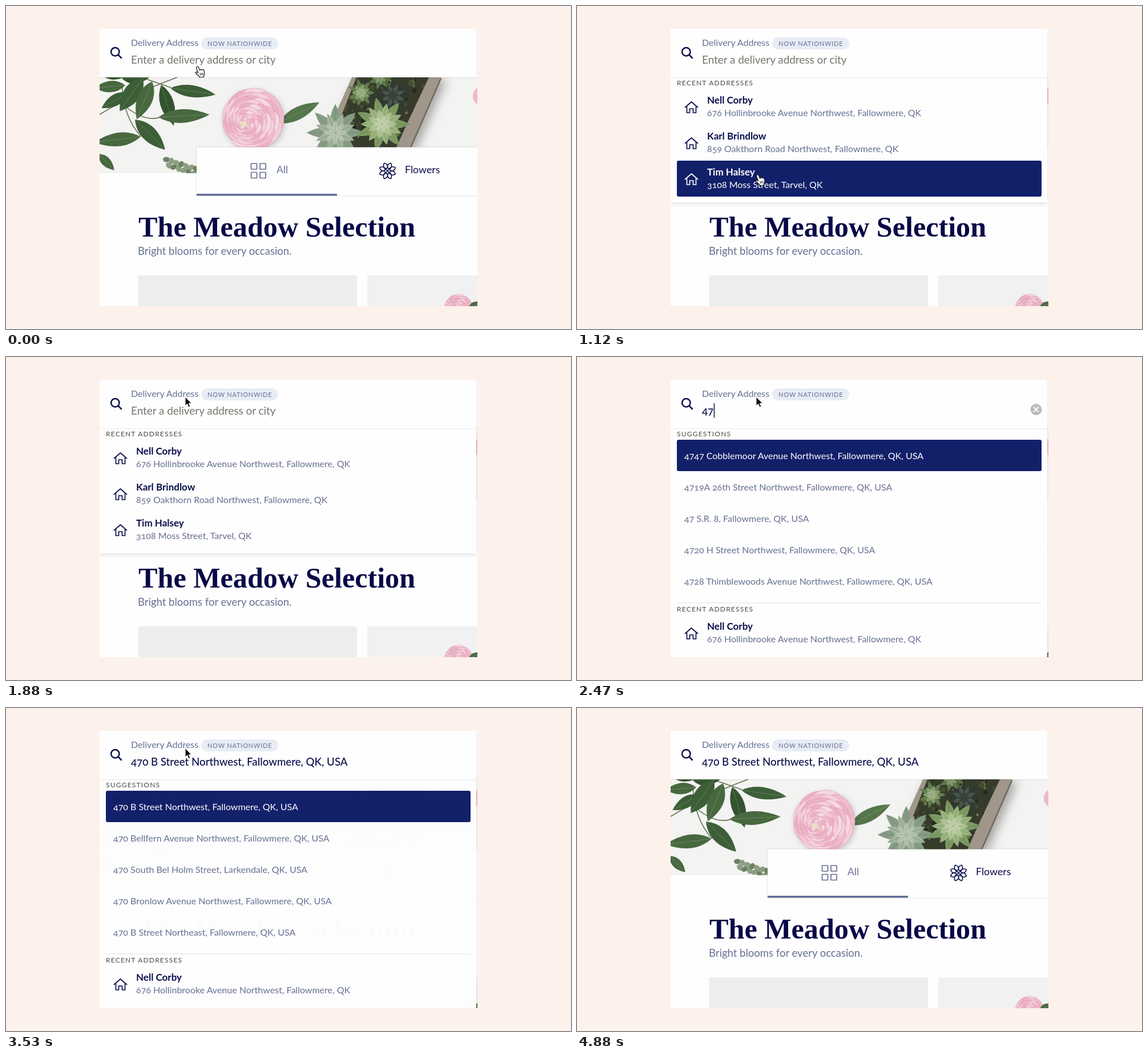
Write an HTML page that moves like this. It is 990 by 566 pixels and loops after 4.94 s.

```html
<!DOCTYPE html>
<html lang="en">
<head>
<meta charset="utf-8">
<title>Delivery address search</title>
<style>
html, body { margin: 0; height: 100%; overflow: hidden; background: #fdf1ec; }
svg { display: block; width: 100vw; height: 100vh; font-family: Lato, "Open Sans", sans-serif; font-variant-numeric: oldstyle-nums; }
text { white-space: pre; }
.caps { font-size: 12px; letter-spacing: 1.2px; fill: #474b40; }
.row { --h: 0; }
.row .back { fill: #12206a; opacity: var(--h); }
.row text { font-size: 16px; fill: color-mix(in srgb, #fff calc(var(--h) * 100%), #667093); }
.row .name { font-size: 17px; font-weight: 700; fill: color-mix(in srgb, #fff calc(var(--h) * 100%), #0b0f4b); }
.row path { fill: none; stroke-width: 1.7; stroke: color-mix(in srgb, #fff calc(var(--h) * 100%), #0b0f4b); }
.sheet { fill: #fefefe; filter: drop-shadow(0 2px 4px #0002); }
</style>
</head>
<body>
<svg id="stage" viewBox="0 0 990 566"></svg>
<script>
const LOOP = 4940, NAVY = '#0b0f4b', SLATE = '#667093';
const CITY = 'Fallowmere, QK';
const RESULTS = {
  '4': ['4 Bellfern Avenue Northwest', '4 Oakthorn Road Northwest', '41 H Street Northwest', '4 Cobblemoor Avenue Northwest', '45 Bronlow Street Northeast'],
  '47': ['4747 Cobblemoor Avenue Northwest', '4719A 26th Street Northwest', '47 S.R. 8', '4720 H Street Northwest', '4728 Thimblewoods Avenue Northwest'],
  '470': ['470 Cobblemoor Avenue Northwest', '470 H Street Northwest', '470 Bellfern Avenue Northwest', '470 26th Street Northeast', '470 Oakthorn Road Northwest'],
  '470 b': ['470 B Street Northwest', '470 Bellfern Avenue Northwest', '470 South Bel Holm Street, Larkendale, QK', '470 Bronlow Avenue Northwest', '470 B Street Northeast']
};
const full = s => (s.includes(',') ? s : `${s}, ${CITY}`) + ', USA';
const PEOPLE = [
  ['Nell Corby', `676 Hollinbrooke Avenue Northwest, ${CITY}`],
  ['Karl Brindlow', `859 Oakthorn Road Northwest, ${CITY}`],
  ['Tim Halsey', '3108 Moss Street, Tarvel, QK']
];

// Markup helpers
const text = (x, y, s, size, fill, more = '') => `<text x="${x}" y="${y}" font-size="${size}" fill="${fill}" ${more}>${s}</text>`;
const rect = (x, y, w, h, fill, more = '') => `<rect x="${x}" y="${y}" width="${w}" height="${h}" fill="${fill}" ${more}/>`;
const caps = (y, s) => `<text class="caps" x="175" y="${y}">${s}</text>`;
const times = (n, fn) => Array.from({ length: n }, (_, i) => fn(i)).join('');
const rand = i => { const v = Math.sin(i * 12.9898) * 43758.5453; return v - Math.floor(v); };

// A leaf grows from its base at an angle in degrees; w is its full width
function leaf(x, y, angle, len, w, fill, vein = '#ffffff38') {
  return `<g transform="translate(${x} ${y}) rotate(${angle})">
    <path d="M0 0Q${len * .42} ${w} ${len} 0Q${len * .42} ${-w} 0 0" fill="${fill}"/>
    <path d="M0 0H${len}" stroke="${vein}" stroke-width=".8"/></g>`;
}

const rosette = (x, y, r, n, colors) => colors.map((c, k) => times(n, i => {
  const len = r * (1 - k / (colors.length + .6));
  return leaf(x, y, (i + k / 2) * 360 / n, len, len * .34, c, '#26402a40');
})).join('');

// Overlapping petals in shrinking rings, drifting towards the heart
function rose(x, y, r) {
  const tones = ['#f0bdcd', '#f5cfda', '#ecb0c4', '#f6d8e0'];
  return times(9, k => {
    const R = r * (1 - k / 10), cx = x - r * .035 * k, cy = y + r * .018 * k;
    return `<g transform="translate(${cx} ${cy}) rotate(${k * 137})">` + times(9, i =>
      `<ellipse transform="rotate(${i * 40})" cx="${R * .68}" rx="${R * .32}" ry="${R * .5}"
        fill="${tones[(i + k) % 4]}" stroke="#dd9bb3" stroke-width=".6"/>`) + '</g>';
  }) + `<circle cx="${x - r * .3}" cy="${y + r * .16}" r="${r * .1}" fill="#e9e2c4"/>`;
}

const GREENS = ['#3d5f38', '#48683f', '#34542f'];
const branch = `<path d="M164 190Q230 150 300 125M237 229Q205 195 203 135M200 168Q240 205 270 195M240 126L289 143" fill="none" stroke="#66714f" stroke-width="1.6"/>
  ${times(3, i => leaf(214 - i * 5, 152 - i * 13, 150 + i * 25, 54, 20, GREENS[i]))}
  ${leaf(203, 127, -2, 48, 20, GREENS[2])}${leaf(162, 259, 46, 40, 16, GREENS[1])}
  ${times(4, i => leaf(240 + i * 16, 126 + i * 6, 125 - i * i * 13, 71 + i * i, 30 - i * 3, GREENS[i % 3]))}
  ${leaf(267, 195, -3, 90, 24, GREENS[1])}${leaf(226, 199, 45, 75, 26, GREENS[0])}${leaf(236, 229, 173, 82, 24, GREENS[1])}`;
const sprig = times(13, i => `<ellipse transform="translate(${281 + i * 4.3} ${272 + i * 1.4 + (i % 2 ? 6 : -3)}) rotate(${i * 50})" rx="6" ry="4.5" fill="${i % 3 ? '#8d9f82' : '#6d8263'}"/>`);

const SOIL = 'M614 125H741L699 214L684 248H566Z';
const planter = `<path d="M606 125H763L709 250H550Z" fill="#a0978a" style="filter:drop-shadow(9px 3px 9px #0005)"/>
  <path d="M762 127L709 248" stroke="#71685d" stroke-width="2.5"/><path d="${SOIL}" fill="#363b2c"/>
  <g clip-path="url(#soil)">${times(110, i => `<circle cx="${580 + rand(i) * 165}" cy="${125 + rand(i + 99) * 110}" r="${1.5 + rand(i + 7) * 4}" fill="${['#66743f', '#434d2f', '#25291f'][i % 3]}"/>`)}</g>
  ${rosette(678, 157, 30, 8, ['#303934', '#4c574d', '#38433c'])}
  ${rosette(655, 126, 21, 7, ['#607a4d', '#8aa175'])}
  ${rosette(622, 152, 24, 7, ['#64814f', '#8ba572', '#a8bb8e'])}
  ${rosette(577, 222, 50, 8, ['#869c84', '#a2b49c', '#b9c7b0'])}
  ${rosette(659, 207, 48, 7, ['#7d9a63', '#9bb580', '#b3c798', '#c9d5b0'])}`;

const hero = `<g clip-path="url(#hero)">${rect(164, 125, 662, 168, '#f3f3f2')}${branch}${sprig}
  ${leaf(478, 205, -27, 80, 22, '#55754a')}
  <g style="filter:drop-shadow(2px 3px 5px #0003)">${rose(433, 198, 54)}</g>
  ${planter}<ellipse cx="830" cy="158" rx="12" ry="15" fill="#efb9ca"/></g>`;

const HOME = 'M189 33L200.5 23L212 33M192.5 31V42H197.5V35H203.5V42H208.5V31';
const person = ([name, address], y, id) => `<g class="row" id="${id}" transform="translate(0 ${y})">
  <rect class="back" x="175" width="639" height="63" rx="3"/><path d="${HOME}"/>
  <text class="name" x="228" y="26">${name}</text><text x="228" y="48">${address}</text></g>`;
const option = i => `<g class="row" id="option${i}" transform="translate(0 ${145 + i * 55})">
  <rect class="back" x="175" width="639" height="55" rx="3"/><text x="188" y="34"></text></g>`;

stage.innerHTML = `<defs>
  <clipPath id="card">${rect(164, 40, 662, 486)}</clipPath>
  <clipPath id="hero">${rect(164, 125, 662, 168)}</clipPath>
  <clipPath id="soil"><path d="${SOIL}"/></clipPath></defs>
${rect(0, 0, 990, 566, '#fdf1ec')}
<g clip-path="url(#card)">${rect(164, 40, 662, 486, '#fefefe')}${hero}
  <rect class="sheet" x="334" y="247.5" width="500" height="85" style="filter:drop-shadow(0 0 1px #0003)"/>
  ${rect(334, 329, 246, 3.5, '#626d97')}
  <g fill="none" stroke="${SLATE}" stroke-width="1.7">${times(4, i => rect(429.5 + i % 2 * 15.5, 276 + (i >> 1) * 15.5, 10, 10, 'none', 'rx=".5"'))}</g>
  ${text(474, 293, 'All', 17.5, SLATE)}
  <g fill="none" stroke="${NAVY}" stroke-width="1.5" stroke-linejoin="round" transform="translate(668.5 289)">
    ${times(8, i => `<path transform="rotate(${i * 45 + 22.5})" d="M0 -4Q-7 -9 0 -15Q7 -9 0 -4"/>`)}
    ${times(4, i => `<path transform="rotate(${i * 90 + 45})" d="M0 0V-5"/>`)}</g>
  ${text(699, 293, 'Flowers', 17.8, NAVY)}
  ${text(232, 404, 'The Meadow Selection', 50.2, '#080848', 'font-family="Liberation Serif, serif" font-weight="700"')}
  ${text(231, 436, 'Bright blooms for every occasion.', 18.5, SLATE)}
  ${rect(231.5, 472, 383.5, 70, '#ededed', 'rx="2"')}${rect(633, 472, 210, 70, '#f1f1f1', 'rx="2"')}
  ${rose(793, 530, 25)}${leaf(810, 529, -22, 26, 12, '#4c6a41')}

  <g id="panel">
    <g id="recent"><rect class="sheet" x="164" y="120" width="660" height="224"/>
      ${caps(139, 'RECENT ADDRESSES')}${PEOPLE.map((p, i) => person(p, 145 + i * 63, 'person' + i)).join('')}</g>
    <g id="suggest"><rect class="sheet" x="164" y="120" width="660" height="430"/>
      ${caps(139, 'SUGGESTIONS')}${times(5, option)}
      ${rect(175, 430.5, 639, 1, '#e2e2e2')}${caps(446, 'RECENT ADDRESSES')}${person(PEOPLE[0], 452, 'again')}</g>
  </g>

  <rect x="164" y="40" width="660" height="85" fill="#fefefe" style="filter:drop-shadow(0 0 1px #0003)"/>
  <g fill="none" stroke="${NAVY}" stroke-width="2.5" stroke-linecap="round"><circle cx="191.3" cy="80.2" r="7.2"/><path d="M196.6 85.5L202 91"/></g>
  ${text(219, 70, 'Delivery Address', 16, SLATE)}
  ${rect(342, 55, 135, 21, '#e8ecf5', 'rx="10.5"')}
  ${text(353, 70, 'NOW NATIONWIDE', 11, SLATE, 'letter-spacing=".8"')}
  ${text(219, 101, 'Enter a delivery address or city', 18.9, '#76766f', 'id="hint"')}
  ${text(219, 101, '', 18.7, NAVY, 'id="query" font-weight="500"')}
  ${rect(219, 81, 1.5, 25.5, NAVY, 'id="caret"')}
  <g id="clear"><circle cx="804.5" cy="92" r="10" fill="#bbb"/><path d="M800 87.5l9 9m0 -9l-9 9" stroke="#fff" stroke-width="1.8"/></g>
</g>
<g id="cursor">
  <g id="hand" transform="translate(-4 -1.5)" fill="#fff" stroke="#111" stroke-width="1.2" stroke-linejoin="round">
    <path d="M3.5 1.5Q5.5 .5 6.5 2.5L8.5 7.5Q10.5 5.5 11.5 7Q13 5.5 14 7Q15.5 6 16 8L17 13Q17 16 15.5 17V19.5L8 20L7.5 18Q4 15.5 1.5 12.5Q.5 10.5 2.5 10.5L5.5 12L2.5 4Q2 2.2 3.5 1.5Z"/>
    <path d="M9 12.5l.8 4M11.4 12.2l.6 4M13.8 12l.3 4" stroke-width="1"/></g>
  <path id="beam" d="M-4 -9Q0 -9 0 -6Q0 -9 4 -9M0 -6V6M-4 9Q0 9 0 6Q0 9 4 9M-2 3H2" fill="none" stroke="#1a1a3a" stroke-width="1.6"/>
  <path id="arrow" d="M0 0V15.5L3.6 12.2L6 18L8.8 16.8L6.4 11.2H11.2Z" fill="#111" stroke="#fff" stroke-width="1"/>
</g>`;

// Timing
const fade = (t, a, b) => Math.min(1, Math.max(0, (t - a) / (b - a)));
const ease = (t, a, b) => 1 - (1 - fade(t, a, b)) ** 2.5;
const $ = id => document.getElementById(id);
const show = (id, on) => $(id).setAttribute('opacity', +on);
const glow = (id, h) => $(id).style.setProperty('--h', h);

const TYPED = '470 b', KEY_TIMES = [2240, 2470, 2590, 2880, 2940];
const OPEN = 60, SUGGEST = 2290, CHOOSE = 3530, BLINK = 530;

// Down over the list, back up to the field, then away after choosing
function cursorAt(t) {
  const down = ease(t, 690, 1120), up = ease(t, 1180, 1650), away = ease(t, CHOOSE, 3950);
  return { x: 335 - 19 * down - 2 * up - away, y: 106.5 + 189.5 * down - 226 * up + 101.5 * away };
}

// The first row is active until the pointer has visited the list
function activeRow(t) {
  const row = Math.floor((cursorAt(t).y - 145) / 63);
  return row < 0 && t < 1180 ? 0 : row;
}

// Highlights follow the active row with a short linear transition
function rowGlow(t, row) {
  let sum = 0;
  for (let lag = 20; lag < 180; lag += 10) sum += activeRow(t - lag) === row;
  return sum / 16;
}

function draw(t) {
  const typed = TYPED.slice(0, KEY_TIMES.filter(k => k <= t).length);
  const query = t < CHOOSE ? typed : full(RESULTS[TYPED][0]);
  show('hint', !query);
  $('query').textContent = query;
  const blink = t >= 120 && (t - 120) % (2 * BLINK) < BLINK;
  show('caret', typed ? t < CHOOSE : blink);
  $('caret').setAttribute('x', 219 + (query && $('query').getComputedTextLength() + .5));
  show('clear', typed && t < CHOOSE);

  show('panel', fade(t, OPEN, 230) - fade(t, CHOOSE, 3680));
  $('recent').setAttribute('display', t < SUGGEST ? 'inline' : 'none');
  $('suggest').setAttribute('display', t < SUGGEST ? 'none' : 'inline');
  PEOPLE.forEach((_, i) => glow('person' + i, rowGlow(t, i)));
  RESULTS[typed.trim() || '4'].forEach((s, i) => $('option' + i).lastElementChild.textContent = full(s));
  glow('option0', typed === TYPED ? fade(t, 3060, 3240) : 1);

  const { x, y } = cursorAt(t);
  const kind = t < 230 || y > 126 ? 'hand' : t < 1770 ? 'beam' : 'arrow';
  for (const k of ['hand', 'beam', 'arrow']) show(k, k === kind);
  $('cursor').setAttribute('transform', `translate(${x} ${y})`);
  show('cursor', 1 - fade(t, 4700, 4870));
}

const start = performance.now();
function tick() {
  draw((performance.now() - start) % LOOP);
  requestAnimationFrame(tick);
}
tick();
</script>
</body>
</html>
```
